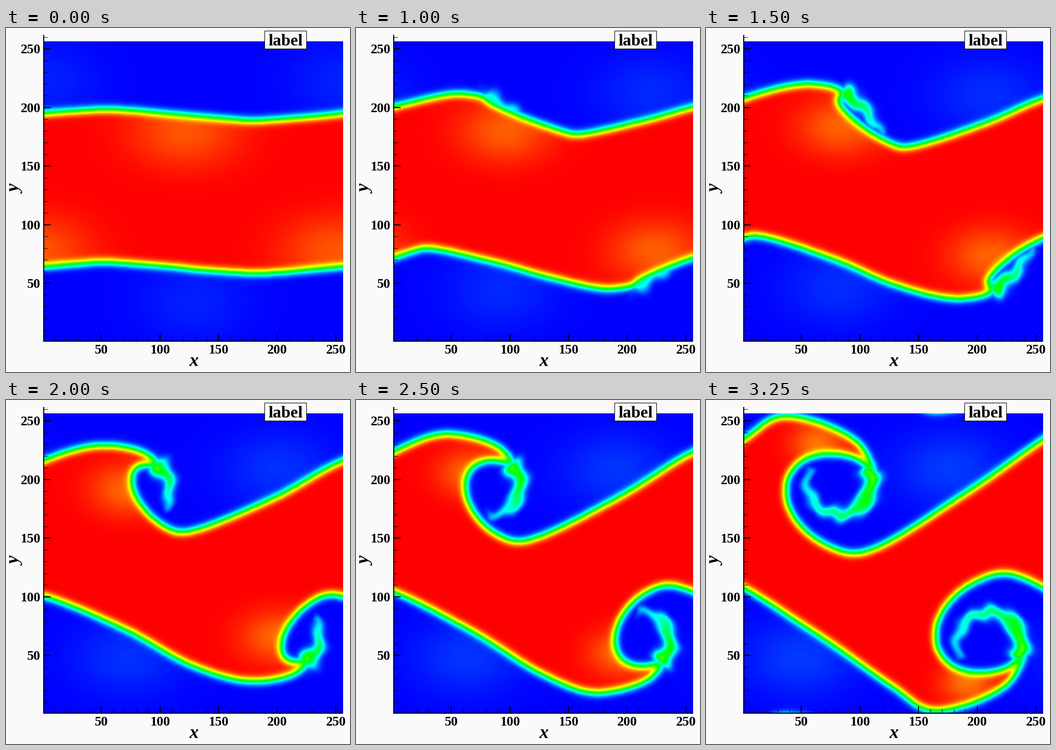
Recreate the animation shown at these times as a matplotlib script. Size 748 by 748 pixels, loop 3.5 s.

```python
import numpy as np
import matplotlib.pyplot as plt
from matplotlib.animation import FuncAnimation
from matplotlib.colors import LinearSegmentedColormap
from matplotlib.path import Path

SIZE, DPI = 748, 100
FRAMES, INTERVAL = 14, 250
LEFT, RIGHT, TOP, BOTTOM = 82, 733, 29.5, 681
PERIOD = RIGHT - LEFT
N = 326                    # grid cells per side, even so half a period is exact
BLUR = 4.3                 # shear layer thickness in cells
PT = 72 / DPI
STAGES = np.array([0, 4, 8, 13])


def hermite(a, b, da, db, u):
    return (a * (2 * u**3 - 3 * u**2 + 1) + da * (u**3 - 2 * u**2 + u)
            + b * (3 * u**2 - 2 * u**3) + db * (u**3 - u**2))


def track(*values):
    """Ease a number or point through the growth stages, starting at rest."""
    values = np.array(values, float)
    slopes = np.gradient(values, STAGES, axis=0)
    slopes[0] = 0

    def at(t):
        j = min(np.searchsorted(STAGES, t, side="right") - 1, len(STAGES) - 2)
        span = STAGES[j + 1] - STAGES[j]
        return hermite(values[j], values[j + 1], slopes[j] * span,
                       slopes[j + 1] * span, (t - STAGES[j]) / span)
    return at


# upper layer: the wave and its overhanging arm
climb = track((82, 186), (82, 172), (82, 132), (82, 86))
crest = track((220, 177), (210, 144), (205, 99), (165, 36))
shoulder = track((245, 178), (262, 147), (300, 115), (330, 93))
tip = track((262, 179), (278, 151), (332, 142), (374, 185))
bend = track((700, 190), (640, 198), (585, 212), (560, 206))

# vortex core: a leaning ellipse
centre = track((405, 191), (380, 193), (345, 214), (301, 225))
width = track(0, 20, 60, 124)
height = track(11, 39, 74, 108)
lean = track(125, 98, 40, 33)

# tail: an arc leaving the arm, given by heading, turn and length
heading = track(10, 28, 40, 75)
turn = track(0, 0, 75, 215)
length = track(120, 150, 95, 265)

warm = track((390, 225), (325, 225), (265, 195), (242, 95))
cool = track((735, 115), (640, 140), (590, 150), (530, 150))


def smooth(points, steps=14):
    s = np.r_[0, np.cumsum(np.linalg.norm(np.diff(points, axis=0), axis=1)**.5)]
    slopes = np.gradient(points, s, axis=0)
    u = np.linspace(0, 1, steps, endpoint=False)[:, None]
    return np.vstack([hermite(points[i], points[i + 1], slopes[i] * ds,
                              slopes[i + 1] * ds, u)
                      for i, ds in enumerate(np.diff(s))] + [points[-1:]])


def core(t):
    phi = np.linspace(-.55 * t / STAGES[-1], np.pi, 8)
    x, y = centre(t)
    return np.column_stack([x - lean(t) * np.cos(phi) - width(t) * np.sin(phi),
                            y - height(t) * np.cos(phi)])


def mirror(field):
    """The lower layer is the upper one flipped and moved half a period."""
    return np.roll(field[::-1], N // 2, axis=1)


cells = (np.arange(N) + .5) / N
X, Y = np.meshgrid(LEFT + cells * PERIOD, TOP + cells * (BOTTOM - TOP))
GRID = np.column_stack([X.ravel(), Y.ravel()])
freq = np.fft.fftfreq(N)
KERNEL = np.exp(-2 * (np.pi * BLUR)**2 * (freq[:, None]**2 + freq**2))

# gentle warp that frays the tail
WX = X + 4 * np.sin(Y * .11 + X * .03)
WY = Y + 4 * np.sin(X * .13 + Y * .04)


def patch(point, rx, ry, strength):
    dx = (X - point[0] + PERIOD / 2) % PERIOD - PERIOD / 2
    return strength * np.exp(-.5 * ((dx / rx)**2 + ((Y - point[1]) / ry)**2))


def layer(t):
    points = np.vstack([climb(t), crest(t), shoulder(t), tip(t), core(t), bend(t)])
    shift = np.array([PERIOD, 0])
    curve = smooth(np.vstack([points[-3:] - shift, points, points[:4] + shift]))
    floor = [(curve[-1, 0], 2000), (curve[0, 0], 2000)]
    inside = Path(np.vstack([curve, floor])).contains_points(GRID)
    return inside.reshape(N, N).astype(float)


def tail(t):
    u = np.linspace(0, 1, 60)
    angle = np.radians(heading(t) + turn(t) * u)
    x, y = (tip(t) + core(t)[0]) / 2
    step = length(t) / len(u)
    xs, ys = x + np.cumsum(np.cos(angle)) * step, y + np.cumsum(np.sin(angle)) * step
    grown = min(t / 7, 1)
    strength = grown**2 * (3 - 2 * grown)
    field = np.zeros((N, N))
    for px, py, f in zip(xs, ys, u):
        level, spread = strength * (.58 - .4 * f), 13 - 6 * f
        d2 = (WX - px)**2 + (WY - py)**2
        np.maximum(field, level * np.exp(-d2 / (2 * spread**2)), out=field)
    return field


def density(t):
    age = t / STAGES[-1]
    body = layer(t)
    body = np.fft.ifft2(np.fft.fft2(body * mirror(body)) * KERNEL).real
    wisp = tail(t)
    field = np.maximum(body, np.maximum(wisp, mirror(wisp)))
    hot = patch(warm(t), 85 - 45 * age, 55 - 25 * age, .085 + .03 * age)
    cold = patch(cool(t), 85, 58, .033 + .025 * age)
    field = field * (1 - hot) * (1 - mirror(hot))
    return np.clip(field + (cold + mirror(cold)) * (1 - field), 0, 1)


fig = plt.figure(figsize=(SIZE / DPI, SIZE / DPI), dpi=DPI, facecolor="#fafafa")
ax = fig.add_axes([0, 0, 1, 1])
rainbow = LinearSegmentedColormap.from_list(
    "rainbow5", ["#0000ff", "#00ffff", "#00ff00", "#ffff00", "#ff0000"], N=512)
image = ax.imshow(density(0), cmap=rainbow, vmin=0, vmax=1, aspect="auto",
                  interpolation="bilinear", extent=(LEFT, RIGHT, BOTTOM, TOP))
ax.set_xlim(0, SIZE)
ax.set_ylim(SIZE, 0)
ax.axis("off")


def rule(xs, ys, px):
    ax.plot(xs, ys, color="black", lw=px * PT, solid_capstyle="butt")


def write(x, y, text, px, **kw):
    ax.text(x, y, text, fontsize=px * PT, family="Liberation Serif",
            weight="bold", va="baseline", **kw)


rule([LEFT, LEFT], [15, BOTTOM + 1], 2.4)
rule([LEFT - 1, RIGHT], [BOTTOM, BOTTOM], 2.4)
for value in range(10, 261, 10):
    px, py = 80 + 2.55 * value, 682.5 - 2.55 * value
    major = value % 50 == 0
    tick, weight = (15, 2.4) if major else (9, 1)
    rule([LEFT, LEFT + tick], [py, py], weight)
    if value <= 250:
        rule([px, px], [BOTTOM, BOTTOM - tick], weight)
    if major:
        write(75, py + 10, str(value), 29, ha="right")
        write(px, 708, str(value), 29, ha="center")

write(408, 735, "x", 40, ha="center", style="italic")
write(31, 350, "y", 40, ha="center", style="italic", rotation=90,
      rotation_mode="anchor")
ax.add_patch(plt.Rectangle((562, 5.5), 91, 39.5, fc="#fafafa", ec="black",
                           lw=1.2 * PT, zorder=5))
write(607.5, 38, "label", 36.5, ha="center", zorder=6)


def update(frame):
    image.set_data(density(frame))
    return [image]


anim = FuncAnimation(fig, update, frames=FRAMES, interval=INTERVAL,
                     repeat=True, repeat_delay=0)
plt.show()
```
